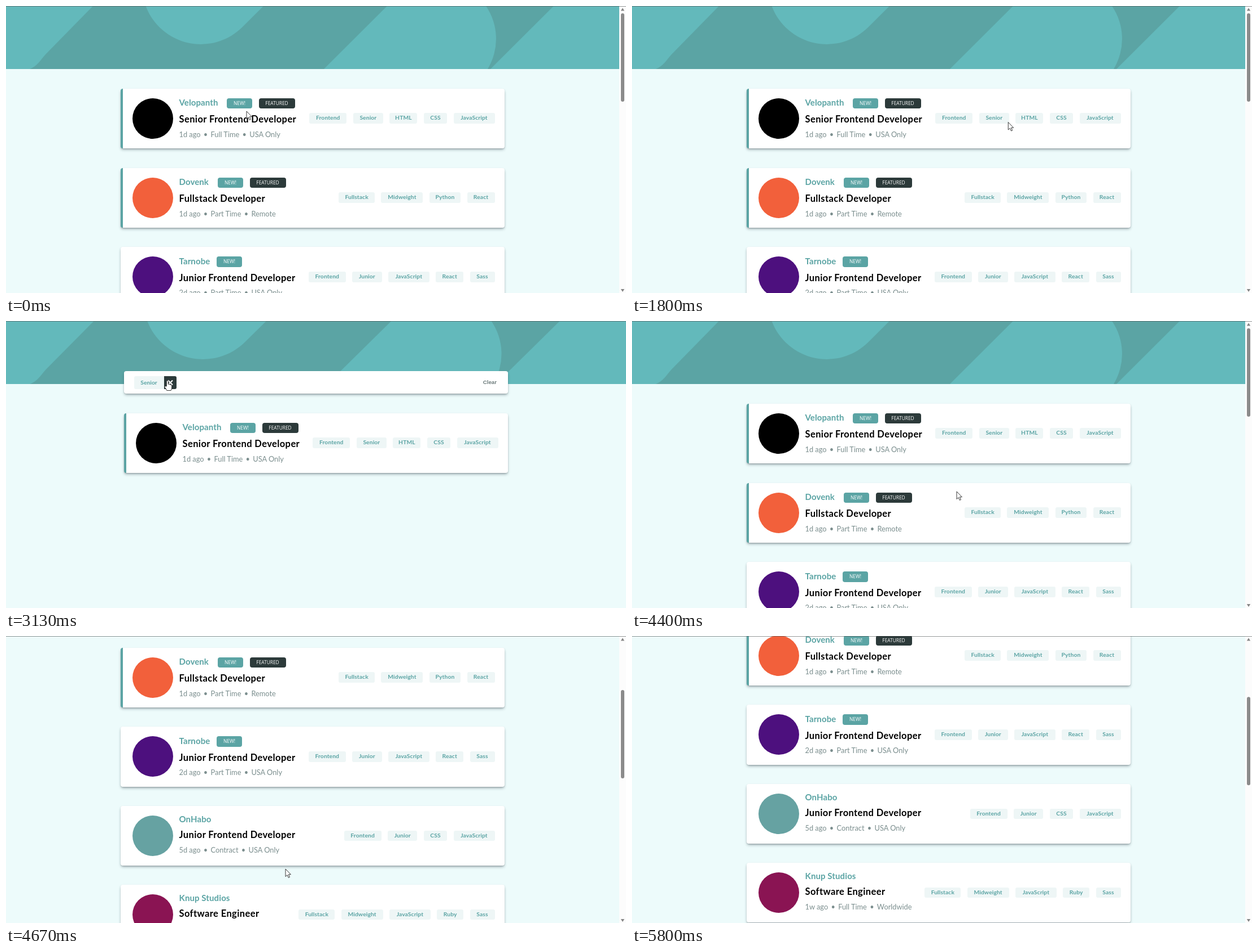
An HTML page that plays this animation: 1098x510 px, repeating every 6270 ms.

```html
<!DOCTYPE html>
<html lang="en">
<head>
<meta charset="utf-8">
<title>Job listings with filter</title>
<style>
  :root { --teal: #5ba4a4; --dark: #2c3a3a; --pale: #eef6f6; --gray: #7b8e8e; }
  html, body { margin: 0; width: 100%; height: 100%; overflow: hidden; }
  body { position: relative; background: #edfbfb; font-family: Lato, sans-serif; }
  #stage { position: absolute; left: 0; top: 0; width: 1098px; height: 510px; overflow: hidden; background: #edfbfb; }
  #stage * { box-sizing: border-box; white-space: nowrap; cursor: default; }
  #page, #page > *, .card > *, .filter > * { position: absolute; }
  #page { left: 0; top: 0; width: 1086px; height: 850px; }
  .filtered #page { width: 1098px; }
  .hero { left: 0; top: 0; width: 100%; height: 112px; display: block; }

  .card, .filter {
    left: calc(50% - 340px); width: 680px; background: #fff; border-radius: 4px;
    box-shadow: 0 1px 2px rgba(0, 0, 0, .12), 0 3px 5px -1px rgba(40, 60, 70, .45);
  }
  .card { height: 106.3px; border-left: 4px solid #fff; }
  .card.featured { border-left-color: var(--teal); }
  .filtered .card { display: none; }
  .filtered .card:first-of-type { display: block; margin-top: 17px; }
  .logo { left: 16.5px; top: calc(50% - 36px); width: 72px; height: 72px; border-radius: 50%; }
  .name, .title, .meta { left: 99.5px; line-height: 19px; }
  .name { top: 13.5px; font-size: 15px; font-weight: 700; letter-spacing: .1px; color: var(--teal); }
  .title { top: 41.5px; font-size: 16.5px; font-weight: 700; letter-spacing: .4px; color: #000; }
  .meta { top: 68.5px; font-size: 12.8px; color: var(--gray); }
  .tall .name { top: 15.5px; }
  .tall .title { top: 45.3px; }
  .tall .meta { top: 72px; }
  .meta i { display: inline-block; width: 18px; text-align: center; font-style: normal; }
  .badge {
    top: 17px; height: 18.5px; border-radius: 4px; text-align: center; color: #fff;
    font: 8.4px/18px "Open Sans", sans-serif;
  }
  .new { width: 45px; background: var(--teal); }
  .feat { width: 64px; background: var(--dark); }
  .tags { right: 17.5px; top: calc(50% - 9.3px); display: flex; gap: 11.3px; }
  .tag {
    height: 18.5px; border-radius: 3px; background: var(--pale); color: var(--teal);
    font-size: 10.3px; font-weight: 700; line-height: 17.5px; letter-spacing: .1px; text-align: center;
  }
  .title.on { color: var(--teal); }
  .tag.on { background: var(--teal); color: #fff; }

  .filter { top: 89px; height: 40px; display: none; }
  .filtered .filter { display: block; }
  .chip {
    left: 17.5px; top: 8.5px; width: 53px; height: 23px; border-radius: 3px 0 0 3px; background: var(--pale);
    color: var(--teal); font-size: 10.3px; font-weight: 700; line-height: 22px; text-align: center;
  }
  .close { left: 70.5px; top: 8.5px; width: 22px; height: 23px; border-radius: 0 3px 3px 0; background: var(--teal); }
  .close.on { background: var(--dark); }
  .close svg { display: block; width: 22px; height: 23px; }
  .clear { right: 20px; top: 10px; color: #6d7c7c; font: 700 9.7px/20px "Liberation Sans", sans-serif; }

  #bar { position: absolute; left: 1086px; top: 0; width: 12px; height: 510px; background: #fcfcfc; }
  .filtered #bar { display: none; }
  #thumb { position: absolute; left: 3px; top: 13px; width: 6px; height: 157px; border-radius: 3px; background: #8b8b8b; }
  #bar svg { position: absolute; left: 0; top: 0; }
  .edge { position: absolute; left: 0; top: 0; width: 100%; height: 1px; background: rgba(90, 95, 95, .65); }
  #cursor { position: absolute; left: 0; top: 0; width: 1px; height: 1px; overflow: visible; }
  #cursor path { fill: #fff; stroke: #222; stroke-width: .9; stroke-linejoin: round; }
</style>
</head>
<body>
<div id="stage">
  <div id="page">
    <svg class="hero" viewBox="0 0 1086 112" preserveAspectRatio="none">
      <path fill="#5ba4a4" d="M0 0H1086V112H0Z"/>
      <path fill="#63b9bb" d="M0 0H154L70 86C62 95 54 108 42 112H0Z
        M247.5 0A104 104 0 0 0 418.5 37.5L456 0Z
        M675 0H850A104 104 0 0 1 853 112H563Z
        M970 0H1086V112H858Z"/>
    </svg>
    <section class="filter">
      <div class="chip">Senior</div>
      <div class="close hot"><svg viewBox="0 0 22 23"><path d="M7 7.5l8 8m0-8l-8 8" stroke="#fff" stroke-width="2.2"/></svg></div>
      <div class="clear">Clear</div>
    </section>
  </div>
  <div id="bar">
    <svg width="12" height="510" fill="#858585"><path d="M2.8 8.5L6 3.5L9.2 8.5ZM2.8 503L6 508L9.2 503Z"/></svg>
    <div id="thumb"></div>
  </div>
  <div class="edge"></div>
  <svg id="cursor">
    <path id="arrow" d="M0 0V13.5L3.1 10.7L5.3 15.5L7.4 14.5L5.3 9.8H9.4Z"/>
    <path id="hand" d="M-1.7 10V1.2a1.5 1.5 0 0 1 3 0V6.6q1.2-.9 2.4.3q1.4-.6 2.3.6q1.7-.2 1.7 1.4V12q0 3-1.6 5.5H-1.2Q-2.5 14.5-5 11.6q-.6-1.8 1-1.8z"/>
  </svg>
</div>
<script>
const $ = id => document.getElementById(id);
const tagWidth = {
  Frontend: 66, Senior: 53.5, HTML: 49, CSS: 41.5, JavaScript: 73, Fullstack: 64,
  Midweight: 74, Python: 55.5, React: 49, Junior: 52.5, Sass: 44, Ruby: 47
};
const jobs = [
  { y: 146.6, name: 'Velopanth', color: '#000', title: 'Senior Frontend Developer', badge: 184, featured: true,
    meta: '1d ago,Full Time,USA Only', tags: 'Frontend Senior HTML CSS JavaScript' },
  { y: 287.5, name: 'Dovenk', color: '#f2603b', title: 'Fullstack Developer', badge: 168, featured: true,
    meta: '1d ago,Part Time,Remote', tags: 'Fullstack Midweight Python React' },
  { y: 428.3, name: 'Tarnobe', color: '#4d107e', title: 'Junior Frontend Developer', badge: 166,
    meta: '2d ago,Part Time,USA Only', tags: 'Frontend Junior JavaScript React Sass' },
  { y: 569, name: 'OnHabo', color: '#66a2a2', title: 'Junior Frontend Developer',
    meta: '5d ago,Contract,USA Only', tags: 'Frontend Junior CSS JavaScript' },
  { y: 709, name: 'Knup Studios', color: '#8a1453', title: 'Software Engineer',
    meta: '1w ago,Full Time,Worldwide', tags: 'Fullstack Midweight JavaScript Ruby Sass' }
];

const badge = (kind, x, text) => `<div class="badge ${kind}" style="left:${x}px">${text}</div>`;
const card = j => `
  <article class="card ${j.featured ? 'featured' : ''} ${j.badge ? 'tall' : ''}" style="top:${j.y}px">
    <div class="logo" style="background:${j.color}"></div>
    <div class="name">${j.name}</div>
    ${j.badge ? badge('new', j.badge, 'NEW!') : ''}
    ${j.featured ? badge('feat', j.badge + 56.5, 'FEATURED') : ''}
    <div class="title hot">${j.title}</div>
    <div class="meta">${j.meta.split(',').join('<i>•</i>')}</div>
    <div class="tags">${j.tags.split(' ').map(t =>
      `<div class="tag hot" style="width:${tagWidth[t]}px">${t}</div>`).join('')}</div>
  </article>`;
$('page').insertAdjacentHTML('beforeend', jobs.map(card).join(''));
const hot = [...document.querySelectorAll('.hot')];

const LOOP = 6270, RATE = 15 / 1000;
const pointer = [
  [0, 426, 187], [1, 424, 194], [3, 418, 240], [5, 413, 335], [6, 413, 355], [7, 418, 340],
  [9, 430, 240], [10, 434, 221], [12, 452, 206], [15, 528, 201], [16, 543, 197], [20, 611, 196],
  [24, 656, 207], [26, 671, 207], [30, 652, 205], [37, 652, 205], [38, 648, 211], [39, 620, 213],
  [42, 470, 208], [45, 320, 128], [46, 290, 109], [47, 286, 106], [60, 286, 106], [62, 365, 165],
  [64, 490, 258], [66, 575, 303], [68, 555, 345], [70, 495, 414], [73, 300, 525], [76, 67, 515],
  [77, 67, 505], [80, 70, 512], [83, 108, 512], [84, 109, 500], [85, 126, 495], [87, 150, 512]
];
const scroll = [[66, 0], [67, 30], [68, 110], [69, 198], [70, 267], [71, 294], [73, 306]];

function sample(keys, n) {
  const i = keys.findIndex(k => k[0] > n);
  if (i < 0) return keys[keys.length - 1].slice(1);
  if (i === 0) return keys[0].slice(1);
  const a = keys[i - 1], b = keys[i], u = (n - a[0]) / (b[0] - a[0]);
  return a.slice(1).map((v, k) => v + (b[k + 1] - v) * u);
}

function draw(n) {
  $('stage').className = n >= 31 && n < 56 ? 'filtered' : '';
  const [top] = sample(scroll, n);
  $('page').style.transform = `translateY(${-top}px)`;
  $('thumb').style.transform = `translateY(${top * .311}px)`;

  // Hover styles trail the pointer by one tick.
  const [hx, hy] = sample(pointer, n - 1);
  let over = false;
  for (const el of hot) {
    const r = el.getBoundingClientRect();
    const on = hx >= r.left && hx < r.right && hy >= r.top && hy < r.bottom;
    el.classList.toggle('on', on);
    over = over || on;
  }
  const [x, y] = sample(pointer, n);
  $('cursor').style.transform = `translate(${x}px, ${y}px)`;
  $('arrow').style.display = over ? 'none' : '';
  $('hand').style.display = over ? '' : 'none';
}

let shown = -1;
const start = performance.now();
function tick() {
  const n = Math.floor(((performance.now() - start) % LOOP) * RATE + .06);
  if (n !== shown) draw(shown = n);
  requestAnimationFrame(tick);
}
tick();
</script>
</body>
</html>
```
